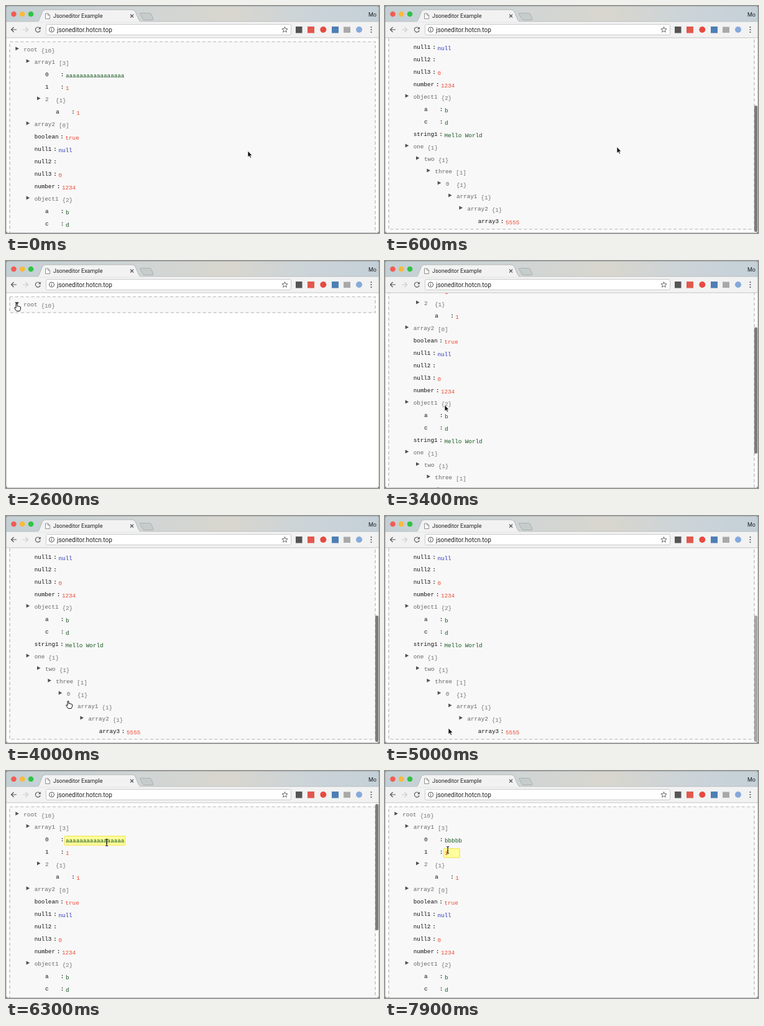
An HTML page for the animation above (8 s loop, 600 by 365 pixels).

```html
<!DOCTYPE html>
<html lang="en">
<head>
<meta charset="utf-8">
<title>JSON tree editor</title>
<style>
  html, body { margin: 0; width: 100%; height: 100%; overflow: hidden; background: #fff; }
  svg { display: block; width: 600px; height: 365px; }
  text { white-space: pre; }
  .ui { font-family: Roboto, sans-serif; fill: #222; }
  #doc { font: 9.25px "Liberation Mono", "Courier New", monospace; }
  .leaf { fill: #111; }
  .branch { fill: #666; }
  .count { fill: #777; }
  .colon { font-weight: bold; fill: #111; }
  .string { fill: #14561c; }
  .number { fill: #ee4a32; }
  .null { fill: #2c35b8; }
  .arrow { fill: #505050; }
  .field { fill: #ffff9c; stroke: #f3e04a; }
  .line { fill: none; stroke: #555; stroke-width: 1.2; }
</style>
</head>
<body>
<svg viewBox="0 0 600 365">
  <defs>
    <linearGradient id="bar">
      <stop offset="0" stop-color="#c3d0d5"/>
      <stop offset=".35" stop-color="#d0d5d5"/>
      <stop offset=".6" stop-color="#d8d6ce"/>
      <stop offset=".8" stop-color="#ccd4d8"/>
      <stop offset="1" stop-color="#c4d0d8"/>
    </linearGradient>
    <clipPath id="page"><rect y="51" width="600" height="314"/></clipPath>
    <clipPath id="window"><rect width="600" height="365" rx="4"/></clipPath>
  </defs>
  <rect width="600" height="365" fill="#55625a"/>
  <g clip-path="url(#window)">
    <rect width="600" height="365" fill="#fff"/>
    <g clip-path="url(#page)">
      <g id="doc"></g>
      <rect id="thumb" x="594" width="5" rx="2.5" fill="#7c7c7c"/>
    </g>

    <rect width="600" height="25" fill="url(#bar)"/>
    <rect y="25" width="600" height="26" fill="#f2f2f2"/>
    <path d="M0 25H600" stroke="#b4b8b9" stroke-width=".8"/>
    <path d="M0 51H600" stroke="#c4c4c4"/>
    <path d="M49 26C53 25 53 22 55 18L58 10Q59.500 6 63 6H203Q207 6 208.500 10L213 21Q214.500 25 219 26Z" fill="#f2f2f2" stroke="#a9adae" stroke-width=".8"/>
    <path d="M48 26H220" stroke="#f2f2f2" stroke-width="1.500"/>
    <path d="M217 11.500H231Q233 11.500 234 14L237 21Q237 22.500 235 22.500H223Q220.500 22.500 219.500 20L215.500 13Q215 11.500 217 11.500Z" fill="#c6cbcc" stroke="#a4a9aa" stroke-width=".8"/>
    <circle cx="12.500" cy="13" r="4.300" fill="#f45b52"/>
    <circle cx="26.200" cy="13" r="4.300" fill="#f7bb3e"/>
    <circle cx="40" cy="13" r="4.300" fill="#2fc344"/>
    <path d="M63.500 12H67.500L70.500 15V20.500H63.500ZM67.500 12V15H70.500" fill="#fff" stroke="#777" stroke-width=".8"/>
    <text class="ui" x="76" y="19" font-size="9">Jsoneditor Example</text>
    <path class="line" d="M200 13.500L205 18.500M205 13.500L200 18.500" stroke-width="1"/>
    <text class="ui" x="583" y="17" font-size="9">Mo</text>

    <path class="line" d="M17 38H8.500M12.500 34L8.500 38L12.500 42"/>
    <path class="line" d="M27 38H35.500M31.500 34L35.500 38L31.500 42" style="stroke:#ccc"/>
    <path class="line" d="M54.500 35.500A4 4 0 1 0 55.200 39.200"/>
    <path d="M55.800 33.500V37.300H52Z" fill="#555"/>
    <rect x="64.500" y="29.500" width="394" height="17" rx="2" fill="#fff" stroke="#c9c9c9"/>
    <circle class="line" cx="73.500" cy="38" r="4" style="stroke-width:1"/>
    <path class="line" d="M73.500 37.500V40.500M73.500 35.500V36.500" style="stroke-width:1"/>
    <text class="ui" x="82" y="41.500" font-size="10">jsoneditor.hotcn.top</text>
    <path class="line" id="star" style="stroke-width:.9"/>
    <rect x="466" y="33" width="10.500" height="10.500" fill="#555"/>
    <rect x="485" y="33" width="11" height="10.500" fill="#e2584d"/>
    <circle cx="510.300" cy="38" r="5" fill="#e84a3f"/>
    <rect x="524" y="33" width="11" height="10.500" fill="#4d7fb5"/>
    <rect x="543" y="33.500" width="11" height="9.500" fill="#a9a9a9"/>
    <circle cx="568" cy="38" r="5" fill="#86a9da"/>
    <g fill="#555"><circle cx="587.500" cy="34" r="1.100"/><circle cx="587.500" cy="38" r="1.100"/><circle cx="587.500" cy="42" r="1.100"/></g>
    <rect x=".5" y=".5" width="599" height="364" rx="4" fill="none" stroke="#9da3a3" stroke-opacity=".6"/>
  </g>

  <g id="pointer">
    <path id="default" d="M0 0V10L2.300 8L4 11.500L5.600 10.700L4 7.400H7Z" fill="#111" stroke="#fff" stroke-width=".7"/>
    <path id="hand" d="M-1 0Q0-1 1 0V4Q2 3 3 4Q4 3.300 5 4.500Q6 4 6.500 5V8Q6 10 5 11.500H0L-3 7.500Q-4 5.800-2.500 5.700L-1 7Z" fill="#fff" stroke="#111"/>
    <path id="beam" d="M-2-5.500Q0-5.500 0-4Q0-5.500 2-5.500M0-4V4M-2 5.500Q0 5.500 0 4Q0 5.500 2 5.500M-1 1.500H1" fill="none" stroke="#111" stroke-width="1.100"/>
  </g>
</svg>
<script>
const LOOP = 8000, STEP = 100, CHAR = 5.55, ROW = 20, INDENT = 17.35;
const $ = id => document.getElementById(id);

// depth, key, value, type; branches have no type
const tree = [
  [0, 'root', '{10}'],
  [1, 'array1', '[3]'],
  [2, '0', '', 'string'],
  [2, '1', '1', 'number'],
  [2, '2', '{1}'],
  [3, 'a', '1', 'number'],
  [1, 'array2', '[0]'],
  [1, 'boolean', 'true', 'number'],
  [1, 'null1', 'null', 'null'],
  [1, 'null2', '', 'null'],
  [1, 'null3', '0', 'number'],
  [1, 'number', '1234', 'number'],
  [1, 'object1', '{2}'],
  [2, 'a', 'b', 'string'],
  [2, 'c', 'd', 'string'],
  [1, 'string1', 'Hello World', 'string'],
  [1, 'one', '{1}'],
  [2, 'two', '{1}'],
  [3, 'three', '[1]'],
  [4, '0', '{1}'],
  [5, 'array1', '{1}'],
  [6, 'array2', '{1}'],
  [7, 'array3', '5555', 'number']
];
const EDITED = 2, NEXT = 3, NESTED = 20;

const pointerPath = [[0, 389, 233], [300, 389, 233], [900, 357, 220], [1300, 357, 220],
  [1900, 17, 69], [2900, 17, 69], [3300, 96, 225], [3600, 96, 250], [3900, 100, 298],
  [4200, 100, 298], [4500, 102, 341], [5400, 102, 341], [6200, 162, 115],
  [7300, 162, 115], [7700, 101, 127]];
const scrollPath = [[0, 0], [200, 0], [500, 164], [700, 164], [1000, 0], [3200, 0],
  [3600, 164], [4699, 164], [4700, 124], [4900, 164], [5300, 164], [5700, 0]];
const barTimes = [[200, 1700], [2900, 5200], [5300, 6700]];

const within = (t, a, b) => t >= a && t < b;

function track(points, t) {
  const next = points.findIndex(p => p[0] > t);
  if (next < 0) return points[points.length - 1].slice(1);
  const a = points[next - 1], b = points[next];
  const k = (t - a[0]) / (b[0] - a[0]), ease = k * k * (3 - 2 * k);
  return a.slice(1).map((v, i) => v + (b[i + 1] - v) * ease);
}

function editedText(t) {
  if (t < 6900) return 'a'.repeat(Math.max(0, Math.min(17, 17 - Math.ceil((t - 6500) / 400 * 17))));
  return 'b'.repeat(Math.min(5, Math.floor((t - 6800) / 100)));
}

function visibleRows(t) {
  if (within(t, 2100, 2900)) return tree.slice(0, 1);
  return within(t, 4200, 4600) ? tree.slice(0, NESTED + 1) : tree;
}

const label = (cls, x, y, s) => `<text class="${cls}" x="${x}" y="${y}">${s}</text>`;

function drawRow([depth, key, value, type], i, state) {
  const x = 28.3 + depth * INDENT, y = 73 + i * ROW, width = key.length * CHAR;
  if (!type) {
    const ax = x - 13, ay = y - 4.5;
    const shape = i === state.closed ? `M${ax - 1} ${ay - 2.5}h6.5l-3.250 5.500z` : `M${ax} ${ay - 3}v6l5.500-3z`;
    return `<path class="arrow" d="${shape}"/>` + label('branch', x, y, key) +
      label('count', x + Math.max(width, 11) + 6, y + 2, value);
  }
  const vx = x + Math.max(width, 22) + 11;
  const text = i === EDITED ? state.text : value, end = text.length * CHAR;
  let out = label('leaf', x, y, key) + label('colon', vx - 8.2, y, ':');
  if (i === state.field) {
    out += `<rect class="field" x="${vx - 1.8}" y="${y - 8.3}" width="${Math.max(26, end + 3)}" height="14.5" rx="1"/>`;
    if (state.caret) out += `<path d="M${vx + end + .5} ${y - 6}v10" stroke="#333" stroke-width=".8"/>`;
  }
  return out + label(type, vx, y + 2, text);
}

function drawDocument(rows, state) {
  const height = 5.5 + rows.length * ROW;
  return `<rect x="6" y="57.500" width="588" height="${height}" fill="#f8f8f8" stroke="#c9c9c9" stroke-width="1.700" stroke-dasharray="5.200 3.400"/>` +
    rows.map((row, i) => drawRow(row, i, state)).join('');
}

function update(t) {
  const rows = visibleRows(t);
  const limit = Math.max(0, 62.5 + rows.length * ROW + 6.5 - 365);
  const scroll = Math.min(limit, track(scrollPath, t)[0]);
  const state = {
    text: editedText(t),
    closed: rows === tree ? -1 : rows.length - 1,
    field: within(t, 6100, 7500) ? EDITED : t >= 7600 ? NEXT : -1,
    caret: within(t, 6400, 7400)
  };
  $('doc').innerHTML = drawDocument(rows, state);
  $('doc').setAttribute('transform', `translate(0 ${-scroll})`);

  const bar = limit > 0 && barTimes.find(([a, b]) => within(t, a, b));
  const thumb = $('thumb');
  thumb.setAttribute('y', 53 + scroll * 107 / 164);
  thumb.setAttribute('height', 314 * 314 / (314 + limit) - 3);
  thumb.setAttribute('opacity', bar ? Math.min(1, (bar[1] - t) / 300) : 0);

  const [x, y] = track(pointerPath, t);
  const shape = within(t, 1900, 3000) || within(t, 3900, 4300) || within(t, 4500, 4700) ? 'hand'
    : within(t, 6100, 7400) || t >= 7600 ? 'beam' : 'default';
  $('pointer').setAttribute('transform', `translate(${x} ${y})`);
  for (const id of ['default', 'hand', 'beam']) $(id).style.display = id === shape ? '' : 'none';
}

const starPoint = (_, i) => {
  const r = i % 2 ? 2.1 : 4.8, a = i * Math.PI / 5;
  return `${448.5 + r * Math.sin(a)} ${38.3 - r * Math.cos(a)}`;
};
$('star').setAttribute('d', `M${Array.from({ length: 10 }, starPoint).join('L')}Z`);

const start = performance.now();
let shown = -1;
function frame() {
  const t = Math.floor((performance.now() - start) % LOOP / STEP) * STEP;
  if (t !== shown) update(shown = t);
  requestAnimationFrame(frame);
}
frame();
</script>
</body>
</html>
```
